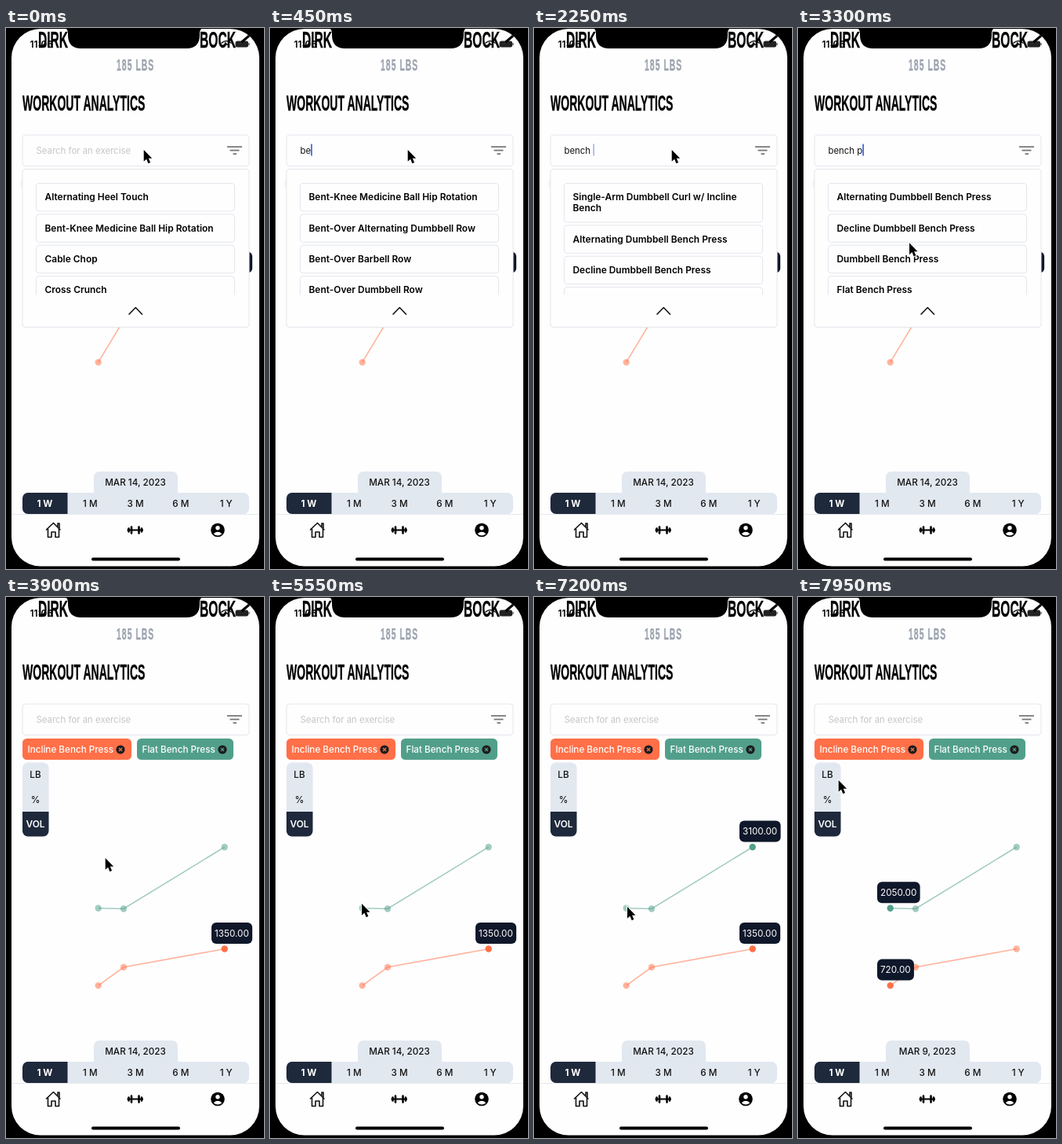
An HTML page for the animation above (8 s loop, 329 px wide and 688 px high).

```html
<!DOCTYPE html>
<html lang="en">
<head>
<meta charset="utf-8">
<title>Workout analytics</title>
<style>
  html, body { margin: 0; width: 100%; height: 100%; overflow: hidden; background: #000; }
  svg { display: block; width: 329px; height: 688px; }
  text { font-family: Inter, sans-serif; font-size: 11.7px; font-weight: 500; fill: #111; white-space: pre; }
  .mid { text-anchor: middle; }
  .bold { font-weight: 600; fill: #000; font-size: 11.95px; }
  .input { font-weight: 400; font-size: 11.4px; }
  .hint { fill: #c6c6ca; }
  .light { fill: #fff; }
  .value { fill: #fff; font-weight: 400; }
  .display { font-family: "Liberation Sans", Arial, sans-serif; font-weight: 700; font-size: 27px; fill: #000; stroke: #000; stroke-width: .4; }
  .box { fill: #fefefe; stroke: #e4e6ed; }
  .icon { fill: none; stroke: #111; stroke-width: 1.6; stroke-linecap: round; stroke-linejoin: round; }
  #cursor { stroke: #fff; stroke-width: 1.8; paint-order: stroke; }
</style>
</head>
<body>
<svg viewBox="0 0 329 688">
  <defs>
    <clipPath id="screen"><rect x="7" y="1" width="316" height="683.5" rx="37"/></clipPath>
    <clipPath id="list"><rect x="30" y="190" width="270" height="149.5"/></clipPath>
    <clipPath id="range"><rect x="21" y="591" width="289" height="27" rx="7"/></clipPath>
    <clipPath id="unit"><rect x="21" y="210.5" width="33.5" height="94" rx="7"/></clipPath>
  </defs>
  <rect width="329" height="688"/>
  <g clip-path="url(#screen)">
    <rect width="329" height="688" fill="#fefefe"/>
    <text x="30.5" y="24.5" class="bold">11:06</text>
    <path class="icon" d="M275 19q6-5 12 0M278 22q3-2.500 6 0"/>
    <rect x="292.500" y="16.500" width="16.500" height="8" rx="2.500" fill="#222"/>
    <path d="M310 19v3" stroke="#222"/>
    <g id="titles"></g>
    <path d="M300.500 18 311 9" stroke="#000" stroke-width="3"/>
    <path d="M73 0Q79 0 79 7V9Q79 26 96 26H230Q247 26 247 9V7Q247 0 253 0Z"/>
    <rect class="box" x="21" y="136" width="289" height="39.500" rx="4"/>
    <path d="M282 151.200h19M285.500 155.700h12M289.500 160.200h4.500" stroke="#777" stroke-width="1.700"/>
    <g id="live"></g>
    <path d="M112 591V572Q112 564 120 564H211Q219 564 219 572V591Z" fill="#e2e8f0"/>
    <text id="date" class="mid" x="165" y="581.700"></text>
    <g id="ranges" clip-path="url(#range)">
      <rect x="21" y="591" width="289" height="27" fill="#e2e8f0"/>
      <rect x="21" y="591" width="57.500" height="27" fill="#1e293b"/>
    </g>
    <path d="M7 618.500H323" stroke="#e8e9ee"/>
    <path class="icon" d="M51.500 638 60.500 629.500 69 638M53.500 637V647.500H58V641H63V647.500H67.500V637M66 634V630H68V636"/>
    <path d="M154.500 638.500H175" stroke="#000" stroke-width="2"/>
    <path d="M156.500 636.500v4M173 636.500v4M160 634.500v8M169.500 634.500v8" stroke="#000" stroke-width="2.600" stroke-linecap="round"/>
    <circle cx="270" cy="638.500" r="8.800"/>
    <circle cx="270" cy="635.800" r="2.700" fill="#fff"/>
    <path d="M264.700 643.200q5.300-4.800 10.600 0-5.300 4.600-10.600 0Z" fill="#fff"/>
    <rect x="109" y="673.500" width="113" height="4" rx="2"/>
  </g>
  <path id="cursor" d="M0 0V14.800L3.400 11.700 5.700 17.200 8.400 16 6.100 10.800H10.500Z"/>
</svg>
<script>
const LOOP = 8000, STEP = 150;
const ORANGE = '#ff7048', GREEN = '#519f8a', NAVY = '#0f172a';
const $ = id => document.getElementById(id);
const pen = document.createElement('canvas').getContext('2d');

const text = (x, y, cls, s) => `<text x="${x}" y="${y}" class="${cls}">${s}</text>`;
const rect = (x, y, w, h, rx, fill) => `<rect x="${x}" y="${y}" width="${w}" height="${h}" rx="${rx}" fill="${fill}"/>`;
const box = (x, y, w, h) => `<rect class="box" x="${x}" y="${y}" width="${w}" height="${h}" rx="3.5"/>`;
const display = (x, y, s, style = '') =>
  `<text class="display" transform="translate(${x} ${y}) scale(.52 1)" style="${style}">${s}</text>`;
const textWidth = (s, size) => {
  pen.font = `400 ${size}px Inter, sans-serif`;
  return pen.measureText(s).width;
};
// latest entry whose start time has passed
const at = (list, t) => list.filter(e => e[0] <= t).pop();

const LISTS = {
  all: ['Alternating Heel Touch', 'Bent-Knee Medicine Ball Hip Rotation', 'Cable Chop', 'Cross Crunch'],
  ben: ['Bent-Knee Medicine Ball Hip Rotation', 'Bent-Over Alternating Dumbbell Row', 'Bent-Over Barbell Row', 'Bent-Over Dumbbell Row'],
  bench: ['Single-Arm Dumbbell Curl w/ Incline|Bench', 'Alternating Dumbbell Bench Press', 'Decline Dumbbell Bench Press', 'Flat Bench Press'],
  press: ['Alternating Dumbbell Bench Press', 'Decline Dumbbell Bench Press', 'Dumbbell Bench Press', 'Flat Bench Press']
};
// time, query, list, caret opacity
const TYPING = [
  [0, '', 'all', 0], [150, 'b', 'all', 1], [300, 'be', 'all', 1], [450, 'be', 'ben', 1], [600, 'ben', 'ben', 1],
  [900, 'benc', 'ben', 1], [1200, 'bench', 'bench', 1], [1800, 'bench', 'bench', .4],
  [1950, 'bench', 'bench', 0], [2250, 'bench ', 'bench', .45], [2400, 'bench p', 'press', 1]
];
const CLOSE = 3600, FIRST_TAP = 6150;
const PICKS = [[0, 2], [FIRST_TAP, 1], [6750, 2], [7350, 0]];
const DATES = ['MAR 9, 2023', 'MAR 10, 2023', 'MAR 14, 2023'];
const POINT_X = [117.7, 150, 278.7];
const INCLINE = { color: ORANGE, values: [720, 1035, 1350] };
const FLAT = { color: GREEN, values: [2050, 2040, 3100] };
const PATH = [
  [0, 175.7, 155], [2850, 175.7, 155], [3000, 172, 168], [3450, 127, 326], [3600, 126.7, 332],
  [4650, 126.7, 332], [4800, 130, 350], [5100, 200, 550], [5250, 213, 566], [5400, 170, 480],
  [5550, 117, 390], [5700, 117, 392], [5850, 121, 393], [6000, 149, 395], [6300, 153, 394],
  [6450, 220, 375], [6600, 272, 322], [6750, 278, 317], [6900, 262, 323], [7200, 119, 394],
  [7500, 117, 395], [7800, 54, 237], [7950, 51.7, 233]
];

function cursorAt(t) {
  const i = PATH.findIndex(p => p[0] > t);
  if (i < 0) return PATH[PATH.length - 1].slice(1);
  const [a, b] = [PATH[i - 1], PATH[i]], k = (t - a[0]) / (b[0] - a[0]);
  return [a[1] + (b[1] - a[1]) * k, a[2] + (b[2] - a[2]) * k];
}

function tooltip(x, y, value) {
  const label = value.toFixed(2), left = x - 16.7;
  return rect(left, y - 33.5, textWidth(label, 11.7) + 8.3, 27, 6, NAVY) + text(left + 4, y - 15.7, 'value', label);
}

function plot({ color, values }, pick, toY) {
  const points = values.map((v, i) => [POINT_X[i], toY(v)]);
  const line = `<polyline points="${points.join(' ')}" fill="none" stroke="${color}" stroke-opacity=".53" stroke-width="1.6"/>`;
  const dots = points.map(([x, y], i) =>
    `<circle cx="${x}" cy="${y}" r="4.2" fill="${color}" fill-opacity="${i === pick ? 1 : .53}"/>`);
  return line + dots.join('') + (pick < 0 ? '' : tooltip(...points[pick], values[pick]));
}

function dropdown(names) {
  let y = 197.5, rows = '';
  for (const name of names) {
    const parts = name.split('|'), h = 35.5 + 14 * (parts.length - 1);
    rows += box(38.5, y, 253, h);
    parts.forEach((p, i) => rows += text(49.5, y + 21.7 + 14 * i, 'bold', p));
    y += h + 3.9;
  }
  return box(21, 179.5, 289, 201) + `<g clip-path="url(#list)">${rows}</g>` +
    '<path class="icon" d="M157 364 165.300 355.500 173.500 364"/>';
}

function chip(x, w, color, label) {
  const cx = x + w - 14;
  return rect(x, 180, w, 27, 5.5, color) + text(x + 6.5, 198, 'light', label) +
    `<circle cx="${cx}" cy="194" r="5.6" fill="#1c1c1c"/>` +
    `<path d="M${cx - 2} 192l4 4m0-4l-4 4" stroke="${color}" stroke-width="1.2"/>`;
}

function units() {
  return `<g clip-path="url(#unit)">${rect(21, 210, 34, 95, 0, '#e2e8f0')}${rect(21, 273, 34, 32, 0, '#1e293b')}</g>` +
    text(37.5, 230.2, 'mid', 'LB') + text(37.5, 261.7, 'mid', '%') +
    '<text x="37.5" y="293" class="bold mid" style="fill:#fff">VOL</text>';
}

const hint = text(38.5, 159.5, 'input hint', 'Search for an exercise');

function searching(t) {
  const [, query, list, caret] = at(TYPING, t);
  const entry = query
    ? text(38.5, 159.5, 'input', query) +
      `<rect x="${38.5 + textWidth(query, 11.4)}" y="147.500" width="1.700" height="15" fill="#3f63dc" opacity="${caret}"/>`
    : hint;
  return rect(18, 189, 20, 17, 8, '#f3f3f5') + plot(INCLINE, 2, v => 318 + (1350 - v) * .17) +
    dropdown(LISTS[list]) + entry;
}

function comparing(t, pick) {
  const toY = v => 318 + (3100 - v) * .074;
  return hint + chip(21, 139, ORANGE, 'Incline Bench Press') + chip(167, 123, GREEN, 'Flat Bench Press') +
    units() + plot(FLAT, t < FIRST_TAP ? -1 : pick, toY) + plot(INCLINE, pick, toY);
}

function render(t) {
  const pick = at(PICKS, t)[1];
  $('live').innerHTML = t < CLOSE ? searching(t) : comparing(t, pick);
  $('date').textContent = DATES[pick];
  $('cursor').setAttribute('transform', `translate(${cursorAt(t)})`);
}

$('titles').innerHTML =
  display(41, 25, 'DIRK', 'font-size:30px') + display(247, 25, 'BOCK', 'font-size:30px') +
  display(141, 54, '185 LBS', 'font-size:20px;letter-spacing:2px;fill:#9ca3af;stroke:#9ca3af') +
  display(21, 105, 'WORKOUT ANALYTICS');
$('ranges').innerHTML += ['1 W', '1 M', '3 M', '6 M', '1 Y'].map((s, i) =>
  `<text x="${49.5 + i * 57.8}" y="608.7" class="mid" style="${i ? '' : 'fill:#fff;font-weight:700'}">${s}</text>`).join('');

const start = performance.now();
let shown = -1;
function loop() {
  const t = Math.floor((performance.now() - start) % LOOP / STEP) * STEP;
  if (t !== shown) render(shown = t);
  requestAnimationFrame(loop);
}
loop();
</script>
</body>
</html>
```
